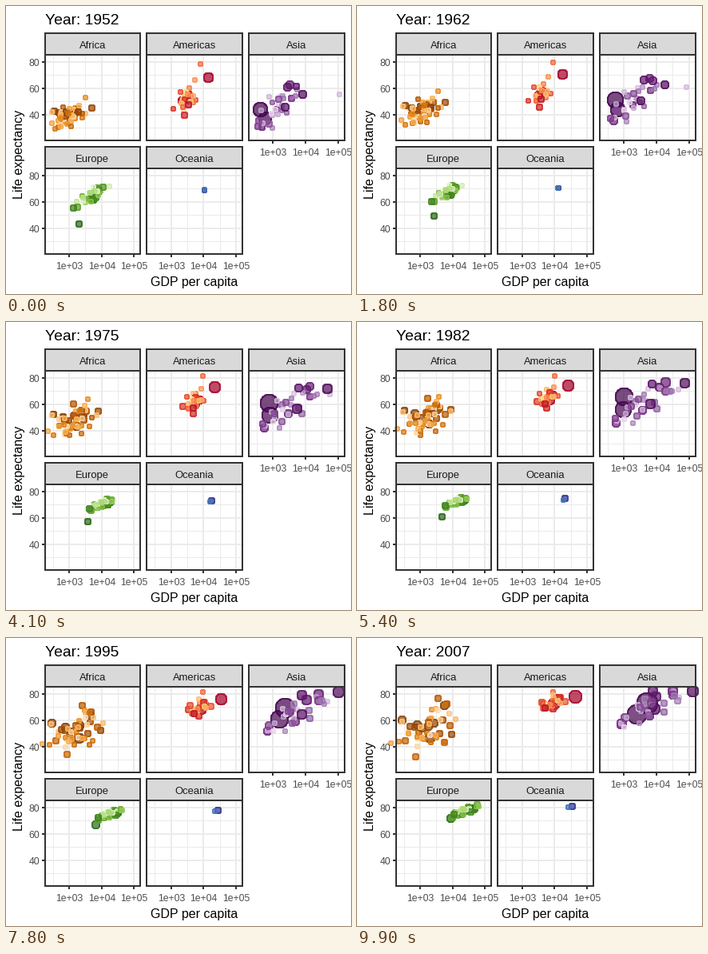
A matplotlib script for the animation above (10000 ms loop, 432 px wide and 360 px high).

```python
import numpy as np
import matplotlib.pyplot as plt
from matplotlib.animation import FuncAnimation
from matplotlib.colors import LinearSegmentedColormap
from matplotlib.patches import Rectangle

W, H, FRAMES = 432, 360, 100
PW, PH, STRIP, GAP = 119.67, 107, 27, 8
DARK, GRID = "0.2", "0.92"
KEYS = (1952, 1980, 2007)
XMIN, XMAX = 2.2487, 5.1887
YMIN, YMAX = 20.649, 85.553
POP_MIN, POP_MAX = 0.06, 1319

plt.rcParams["font.family"] = "Liberation Sans"
fig = plt.figure(figsize=(W / 72, H / 72), dpi=72, facecolor="white")
ax = fig.add_axes([0, 0, 1, 1])
ax.set(xlim=(0, W), ylim=(H, 0))
ax.axis("off")


def line(x0, y0, x1, y1, color, lw=2, z=1):
    ax.plot(np.floor([x0, x1]), np.floor([y0, y1]), color=color, lw=lw,
            zorder=z, solid_capstyle="butt", antialiased=False)


def box(x0, y0, x1, y1, z, **kw):
    x0, y0, x1, y1 = np.floor([x0, y0, x1, y1])
    ax.add_patch(Rectangle((x0, y0), x1 - x0, y1 - y0, ec=DARK, lw=2,
                           zorder=z, antialiased=False, **kw))


def label(x, y, text, size, color="black", **kw):
    return ax.text(x, y, text, fontsize=size, color=color, **kw)


def between(year, values):
    """Straight-line motion of one or many values across KEYS."""
    return np.array([np.interp(year, KEYS, v) for v in np.atleast_2d(values)])


class Panel:
    """One facet: a strip, a grid, a few leading dots and a crowd."""

    def __init__(self, name, col, row, colors, x_axis=False, y_axis=False):
        self.left = 49 + col * (PW + GAP)
        self.top = 61 + row * (PH + STRIP + GAP)
        self.colors = LinearSegmentedColormap.from_list(name, colors)
        self.leaders, self.pops, self.crowd = [], [], None
        self.draw_frame(name, x_axis, y_axis)

    def px(self, log_gdp):
        return self.left + (log_gdp - XMIN) / (XMAX - XMIN) * PW

    def py(self, life):
        return self.top + (YMAX - life) / (YMAX - YMIN) * PH

    def draw_frame(self, name, x_axis, y_axis):
        left, top, right, bottom = self.left, self.top, self.left + PW, self.top + PH
        for v in (2.5, 3.5, 4.5, 3, 4, 5):
            line(self.px(v), top, self.px(v), bottom, GRID, 1 + (v % 1 == 0))
        for v in (30, 50, 70, 40, 60, 80):
            line(left, self.py(v), right, self.py(v), GRID, 1 + (v % 20 == 0))
        box(left, top, right, bottom, 4, fill=False)
        box(left, top - STRIP, right, top, 5, fc="0.85")
        label(left + PW / 2 - 0.5, top - 8, name, 13, "0.1", ha="center", zorder=6)
        if x_axis:
            for v in (3, 4, 5):
                line(self.px(v), bottom, self.px(v), bottom + 4, DARK, z=3)
                label(self.px(v) - 0.5, bottom + 19, f"1e+0{v}", 12.2, "0.3",
                      ha="center")
        if y_axis:
            for v in (40, 60, 80):
                line(left - 4, self.py(v), left, self.py(v), DARK, z=3)
                label(left - 7, self.py(v) + 5, str(v), 12.4, "0.3", ha="right")

    def lead(self, gdp, life, pop):
        """A dot with its own path; pop is (first, last) in millions."""
        self.leaders.append((np.log10(gdp), life))
        self.pops.append(pop)

    def fill(self, n, seed, gdp, gdp_sd, life, life_sd, rho, top_pop, decay, growth):
        """n dots drawn around the continent's moving mean."""
        rng = np.random.default_rng(seed)
        z = rng.standard_normal((4, n))
        z = (z - z.mean(1, keepdims=True)) / z.std(1, keepdims=True)
        self.crowd = z.clip(-2.1, 2.1), (gdp, gdp_sd, life, life_sd), rho
        last = top_pop * np.exp(-decay * rng.permutation(n))
        self.pops += [*zip(last / growth, last)]

    def finish(self):
        """Sizes by population, shades by its rank, darkest first."""
        pops = np.array(self.pops)
        share = (pops - POP_MIN) / (POP_MAX - POP_MIN)
        self.sizes = 2 + 10 * np.sqrt(share.clip(0))
        rank = np.argsort(np.argsort(-pops[:, 1]))
        rgba = self.colors(rank / (len(rank) - 1))
        rgba[:, 3] = 0.7
        self.dots = ax.scatter(pops[:, 0], pops[:, 1], c=rgba, edgecolors=rgba,
                               linewidths=1, zorder=2, antialiased=False)

    def place(self, year, t):
        paths = np.array(self.leaders)
        x, y = between(year, paths[:, 0]), between(year, paths[:, 1])
        if self.crowd:
            (a, b, c, d), trends, rho = self.crowd
            gdp, gdp_sd, life, life_sd = between(year, trends)
            # each dot slowly trades its first rank for a later one
            wealth = a * np.cos(0.7 * t) + c * np.sin(0.7 * t)
            health = b * np.cos(0.7 * t) + d * np.sin(0.7 * t)
            mix = rho * wealth + np.sqrt(1 - rho ** 2) * health
            x = np.append(x, gdp + gdp_sd * wealth)
            y = np.append(y, life + life_sd * mix)
        return x, y.clip(23.6, 82.2)

    def show(self, year, t):
        x, y = self.place(year, t)
        size = self.sizes[:, 0] * (1 - t) + self.sizes[:, 1] * t
        radius = np.round(0.375 * (2.845 * size + 0.945))
        self.dots.set_offsets(np.floor(np.column_stack([self.px(x), self.py(y)])) + 0.5)
        self.dots.set_sizes((2 * radius) ** 2)


africa = Panel("Africa", 0, 0,
               ["#7F3B08", "#B35806", "#E08214", "#FDB863", "#FEE0B6"], y_axis=True)
africa.lead((1077, 1800, 2014), (36.3, 45.3, 46.9), (33, 135))
africa.lead((1419, 3100, 5581), (41.9, 55, 71.3), (22, 80))
africa.lead((4725, 8300, 9270), (45, 57, 49.3), (14, 44))
africa.fill(49, 5, (2.95, 3.13, 3.18), (0.26, 0.34, 0.42), (39, 50, 54.6),
            (5, 7, 9.3), 0.45, 76, 0.11, 3)

americas = Panel("Americas", 1, 0,
                 ["#A50026", "#D73027", "#F46D43", "#FDAE61", "#FEE090"])
americas.lead((13990, 24500, 42952), (68.4, 74, 78.2), (158, 301))
americas.lead((2109, 6900, 9066), (50.9, 62.8, 72.4), (57, 190))
americas.lead((3478, 8700, 11978), (50.8, 66.5, 76.2), (30, 109))
americas.fill(22, 2, (3.48, 3.74, 3.87), (0.2, 0.2, 0.27), (53, 65, 73),
              (9, 6.5, 4.2), 0.7, 44, 0.16, 2.6)

asia = Panel("Asia", 2, 0,
             ["#40004B", "#762A83", "#9970AB", "#C2A5CF", "#E7D4E8"], x_axis=True)
asia.lead((400, 850, 4959), (44, 65, 73), (556, 1319))
asia.lead((547, 830, 2452), (37.4, 55.5, 64.7), (372, 1110))
asia.lead((3217, 18000, 31656), (63, 76, 82.6), (86, 127))
asia.lead((108382, 45000, 47307), (55.6, 70.5, 77.6), (0.2, 2.5))
asia.fill(29, 4, (3.15, 3.57, 3.77), (0.36, 0.5, 0.5), (46, 60.5, 70.3),
          (9, 8.5, 7.5), 0.75, 224, 0.18, 2.8)

europe = Panel("Europe", 0, 1,
               ["#276419", "#4D9221", "#7FBC41", "#B8E186", "#E6F5D0"], True, True)
europe.lead((1969, 4270, 8458), (43.6, 60.3, 71.8), (22, 71))
europe.lead((7144, 21500, 32170), (67.5, 73.3, 79.4), (69, 82))
europe.fill(28, 7, (3.67, 4.1, 4.34), (0.26, 0.2, 0.24), (65, 72.4, 77.7),
            (5, 2.2, 2.8), 0.85, 61, 0.16, 1.3)

oceania = Panel("Oceania", 1, 1, ["#313695", "#4575B4"], x_axis=True)
oceania.lead((10040, 19000, 34435), (69.1, 74.3, 81.2), (8.7, 20.4))
oceania.lead((10557, 17200, 25185), (69.4, 73.3, 80.2), (2, 4.1))

panels = [africa, americas, asia, europe, oceania]
for p in panels:
    p.finish()

title = label(49, 23, "", 19.2)
label(236, 350, "GDP per capita", 16, ha="center")
label(21, 241, "Life expectancy", 16, rotation=90, rotation_mode="anchor",
      ha="left", va="baseline")


def update(i):
    t = i / (FRAMES - 1)
    year = 1952 + 55 * t
    title.set_text(f"Year: {year:.0f}")
    for p in panels:
        p.show(year, t)


anim = FuncAnimation(fig, update, frames=FRAMES, interval=100, repeat=True)
plt.show()
```
